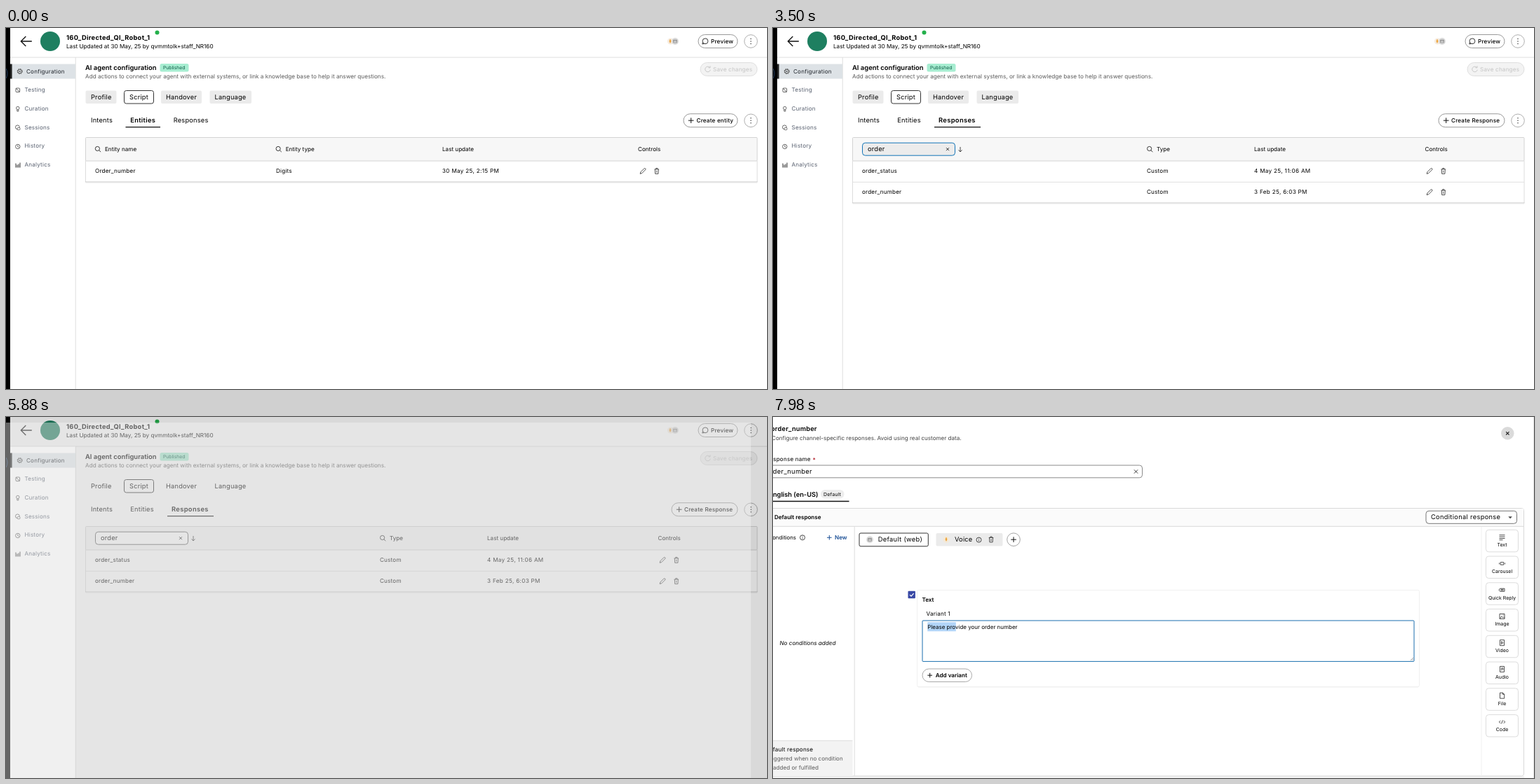
An HTML page for the animation above (8 s loop, 1085 px wide and 516 px high).

```html
<!DOCTYPE html>
<html lang="en">
<head>
<meta charset="utf-8">
<title>Agent responses</title>
<style>
html, body { margin: 0; width: 100%; height: 100%; overflow: hidden; background: #f4f4f4 }
svg { display: block; width: 100%; height: 100%; font-family: Inter, sans-serif; letter-spacing: .2px; text-rendering: geometricPrecision }
.b { font-weight: 600 }
.m { font-weight: 500 }
.n { letter-spacing: 0 }
.w { letter-spacing: .33px }
.g { fill: #5c5c5c }
.s { fill: #596170 }
.c { text-anchor: middle }
.veiled .soft { visibility: hidden }
</style>
</head>
<body>
<svg id="stage" viewBox="0 0 1085 516"></svg>
<script>
const SMALL = 6.96, BODY = 8.12, MID = 9.28;

const text = (x, y, str, size = BODY, cls = '', extra = '') =>
  `<text x="${x}" y="${y}" font-size="${size}" class="${cls}" ${extra}>${str}</text>`;
const rect = (x, y, w, h, fill, stroke = 'none', rx = 0, extra = '') =>
  `<rect x="${x}" y="${y}" width="${w}" height="${h}" fill="${fill}" stroke="${stroke}" rx="${rx}" ${extra}/>`;
const circle = (x, y, r, fill, stroke = 'none') =>
  `<circle cx="${x}" cy="${y}" r="${r}" fill="${fill}" stroke="${stroke}" stroke-width=".9"/>`;
const line = (d, stroke = '#222', width = .9, fill = 'none') =>
  `<path d="${d}" stroke="${stroke}" stroke-width="${width}" fill="${fill}"/>`;
const group = (id, ...parts) => `<g id="${id}">${parts.join('')}</g>`;

// Icons, placed by their centre
const plus = (x, y, color = '#111', r = 3.8) => line(`M${x - r} ${y}h${2 * r}M${x} ${y - r}v${2 * r}`, color, 1);
const cross = (x, y, r = 2, w = .9) => line(`M${x - r} ${y - r}l${2 * r} ${2 * r}m0 ${-2 * r}l${-2 * r} ${2 * r}`, '#222', w);
const search = (x, y) => circle(x - .6, y - .5, 3.1, 'none', '#222') + line(`M${x + 1.7} ${y + 1.8}l2.4 2.4`);
const down = (x, y) => line(`M${x} ${y - 3.5}v7m-2.5 -2.6l2.5 2.6l2.5 -2.6`, '#333');
const info = (x, y) => circle(x, y, 3.5, 'none', '#333') + line(`M${x} ${y - .4}v2.2m0 -4v.9`, '#333', .8);
const trash = (x, y) => line(`M${x - 3.3} ${y - 2.5}h6.6M${x - 1.2} ${y - 2.7}v-1.3h2.4v1.3M${x - 2.5} ${y - 2.3}l.4 6.2h4.2l.4 -6.2M${x} ${y - .6}v2.8`, '#333', .85);
const pencil = (x, y) => line(`M${x - 3.8} ${y + 3.9}l.7 -2.6l4.9 -4.9q1 -.8 1.8 0q.8 .8 0 1.8l-4.9 4.9z`, '#333', .85);
const kebab = (x, y) => circle(x, y, 9.3, '#fff', '#a5a5a5') + [-3.5, 0, 3.5].map(d => circle(x, y + d, .75, '#333')).join('');
const flame = (x, y) => line(`M${x} ${y - 3}q1.8 2.4 1 4.2q-1 1.2 -2 0q-.8 -1.8 1 -4.2M${x} ${y + 2}v1.2`, '#e8a33d', .4, '#efa53c');
const webIcon = (x, y) => circle(x, y, 5, '#dcdcdc') + line(`M${x - 2.4} ${y - 2}h4.8v4h-4.8zM${x - 2.4} ${y - .6}h4.8`, '#777', .7);
const pill = (x, y, w, h = 19, fill = '#fff', stroke = '#8e8e8e') => rect(x, y, w, h, fill, stroke, h / 2, 'stroke-width=".9"');

const chip = (x, w, tx, str) => rect(x, 89.5, w, 18.5, '#ebebeb', 'none', 2, 'class="soft"') + text(tx, 102, str, MID);

const sideIcons = [
  circle(19.7, 62, 2.8, 'none', '#444') + circle(19.7, 62, 1, '#444') +
    '<circle cx="19.7" cy="62" r="3.6" fill="none" stroke="#444" stroke-dasharray="1.4 1.43"/>',
  rect(14, 86, 5.6, 5.6, 'none', '#555', 1, 'stroke-width=".9"') + line('M14 86l5.6 5.6', '#555'),
  circle(16.8, 114.5, 2.2, 'none', '#555') + line('M15.8 117v2h2v-2', '#555'),
  circle(16.4, 141.8, 2.9, 'none', '#555') + rect(16.2, 142.5, 3.8, 3.2, '#fff', '#555', 1, 'stroke-width=".8"'),
  circle(16.8, 169.5, 3.2, 'none', '#555') + line('M16.8 167.5v2.2l1.6 .8', '#555'),
  line('M14 193.5v6M16 195.5v4M18 194.5v5M20 192.5v7', '#555', 1.2)
].join('');

const shell = [
  rect(0, 0, 1085, 516, '#fff'),
  rect(0, 0, 6, 516, '#000'),
  line('M0 58q4 7 0 14', '#26456b'),
  line('M36.8 19H21.5M28.3 12l-7 7l7 7', '#111', 1.3),
  circle(63, 19, 14, '#1e7f60'),
  text(86, 16.5, '160_Directed_QI_Robot_1', MID, 'w', 'font-weight="700"'),
  text(86, 29, 'Last Updated at 30 May, 25 by qvmmtolk+staff_NR160', 8.18, 'n'),
  circle(215.5, 6.4, 3, '#24b04b'),
  circle(947.5, 19, 4.6, '#f6ece0'), flame(947, 19), webIcon(954, 19),
  pill(987, 9.5, 56), circle(997, 18.8, 3.9, 'none', '#222'), line('M993.4 20.5l-.6 2.5l2.6 -.6'),
  text(1005, 22, 'Preview', BODY, 'm'), kebab(1062, 19),
  line('M6 42h1079M99.2 42v474', '#dedede', 1),
  rect(6, 51.5, 93, 21, '#dde2e6'), rect(6, 51.5, 2.6, 21, '#222'),
  sideIcons,
  text(29, 64.8, 'Configuration', BODY, '', 'fill="#20252c"'),
  ...['Testing', 'Curation', 'Sessions', 'History', 'Analytics'].map((s, i) => text(26.5, 91.3 + 26.7 * i, s, BODY, 's')),
  text(113, 59.5, 'AI agent configuration', 9.45, 'b n'),
  rect(219.5, 51, 41, 11.6, '#a7edd1', 'none', 2.5), text(224, 59.4, 'Published', 6.75, 'n', 'fill="#0c5a45"'),
  text(113, 71.6, 'Add actions to connect your agent with external systems, or link a knowledge base to help it answer questions.', 8.18, 'n g'),
  pill(990, 49.5, 81, 19, '#f3f3f3', '#dcdcdc'),
  line('M1003.5 56.5a3.8 3.8 0 1 0 .8 3.2M1004 54.2v2.6h-2.6', '#c4c4c4'),
  text(1008, 62, 'Save changes', BODY, '', 'fill="#c4c4c4"'),
  chip(113.5, 44, 121, 'Profile'),
  rect(168.5, 89.5, 42, 18.5, '#fff', '#333', 3), text(176, 102, 'Script', MID),
  chip(221, 58, 228, 'Handover'), chip(290.5, 59.5, 297.5, 'Language')
].join('');

const tableHead = rect(113.5, 156.5, 957.5, 33.5, '#f7f7f7', '#d3d3d3', 1);
const tableFrame = (bottom) =>
  line(`M113.5 190V${bottom}M1071 190V${bottom}`, '#dcdcdc', 1) +
  line(`M113 ${bottom}H1071.5`, '#c6c6c6', 1.2) + line(`M114 ${bottom + 1.2}H1071`, '#ececec', 1);
const controls = (x, y) => pencil(x, y) + trash(x + 19.8, y);
const under = (x, w) => line(`M${x} 141.6h${w}`, '#111', 1.4);

const entities = group('entities',
  rect(107, 118, 978, 140, '#fff'),
  group('tabHover', rect(231, 122, 65, 20, '#ececec', 'none', 2)),
  text(121, 135, 'Intents', MID), text(177.3, 135, 'Entities', MID, 'b w'), text(238.7, 135, 'Responses', MID),
  under(170.5, 49.5),
  pill(966, 122.7, 77), plus(976.7, 132.2), text(984.5, 135.2, 'Create entity', BODY, 'm'), kebab(1062, 132.3),
  tableHead, tableFrame(220),
  search(131, 173), text(141, 175.6, 'Entity name', BODY, 'n'), group('sort', down(192.5, 173.5)),
  search(388.7, 173), text(398.7, 175.6, 'Entity type', BODY, 'n'),
  text(622, 175.6, 'Last update', BODY, 'n'), text(901, 175.6, 'Controls', BODY, 'n'),
  text(127, 206.8, 'Order_number'), text(385, 206.8, 'Digits'), text(622, 206.8, '30 May 25, 2:15 PM', BODY, 'w'),
  controls(908, 204.5));

const responseRow = (y, name, date) =>
  text(127, y + 2.8, name) + text(533, y + 2.8, 'Custom') + text(686, y + 2.8, date, BODY, 'w') + controls(936, y + .5);

const responses = group('responses',
  rect(107, 118, 978, 140, '#fff'),
  group('tabHover2', rect(231, 122, 65, 20, '#ececec', 'none', 2)),
  text(121, 135, 'Intents', MID), text(177.3, 135, 'Entities', MID), text(236, 135, 'Responses', 9.4, 'b w'),
  under(230, 66),
  pill(949, 122.7, 94), plus(959.7, 132.2), text(967, 135.2, 'Create Response', BODY, 'm'), kebab(1062, 132.3),
  tableHead, tableFrame(250), line('M114 220.3h957', '#e0e0e0', 1),
  rect(127.5, 164.2, 132, 18, '#fff', '#666', 4, 'id="field"'),
  rect(135, 167, 24.5, 13, '#a9cdee', 'none', 0, 'id="picked"'),
  text(135, 176.3, 'order', MID), cross(249, 173.2), down(267, 173.5),
  search(537.2, 173), text(547, 175.6, 'Type', BODY, 'n'),
  text(686, 175.6, 'Last update', BODY, 'n'), text(929.5, 175.6, 'Controls', BODY, 'n'),
  responseRow(204, 'order_status', '4 May 25, 11:06 AM'),
  responseRow(234.2, 'order_number', '3 Feb 25, 6:03 PM'));

// Veil over the page when the dialog starts to open; the sidebar stays lighter
const veil = group('veil',
  rect(0, 0, 1085, 516, '#000', 'none', 0, 'opacity=".08"'),
  '<path d="M0 0H1085V516H99V42H0z" opacity=".08"/>',
  rect(0, 8, 1062, 508, '#f6f6f6', 'none', 0, 'opacity=".41"'));

const ghost = rect(6, 52, 93, 410, '#fff') + rect(113, 190, 957, 60, '#fff');

const toolIcons = {
  Text: 'M-4 -3h8M-4 -.6h8M-4 1.8h8M-4 4h5',
  Carousel: 'M-2.2 -1.8h4.4v3.6h-4.4zM-4 -1v2M4 -1v2',
  'Quick Reply': 'M-3 -2h6.5v4h-6.5l-1.5 -2zM-2 -.6h4M-2 .8h4',
  Image: 'M-3.5 -3.5h7v7h-7zM-3 3l2.3 -3l1.7 1.8l1 -1l1.5 1.7M1 -1.8h1',
  Video: 'M-3 -4h6v8h-6zM-1 -1.8l2.6 1.8l-2.6 1.8z',
  Audio: 'M-3 -4h6v8h-6zM-.8 1.6v-3.2h2v2.6M-1.4 1.6h.6M.6 1h.6',
  File: 'M-3 -4h4l2.2 2.2v5.8h-6.2zM1 -4v2.2h2.2',
  Code: 'M-2.2 -2l-2 2l2 2M2.2 -2l2 2l-2 2M.8 -2.5l-1.6 5'
};
const tools = Object.entries(toolIcons).map(([name, d], i) => {
  const y = 161.3 + 37.75 * i;
  return rect(1016.5, y, 46, 31.5, '#fff', '#dcdcdc', 4) +
    `<g transform="translate(1039.5 ${y + 10.4})">${line(d, '#222', .8)}</g>` +
    text(1039.5, y + 23.8, name, SMALL, 'c n');
}).join('');

const dialogBody = group('dialogBody',
  rect(0, 0, 1085, 516, '#fff'),
  text(-10, 63, 'Response name'), text(56.5, 63.5, '*', BODY, 'b', 'fill="#b3202c"'),
  rect(-20, 69, 546.5, 17.8, '#fff', '#8a8a8a', 4), text(-9.7, 81, 'order_number', MID, 'w'), cross(517.5, 78, 2.6),
  text(-5.7, 113.5, 'English (en-US)', MID, 'b n'),
  rect(68, 104, 33.5, 12.5, '#ededed', 'none', 6.2), text(72, 112.8, 'Default', SMALL),
  line('M0 120.5h108.5', '#111', 1.3),
  rect(-20, 130.5, 1090.5, 382.5, '#fff', '#d9d9d9', 3), rect(0, 131, 1070, 25, '#fbfbfb'),
  line('M0 156.3h1070', '#d9d9d9', 1), line('M116.2 156v357', '#dcdcdc', 1), line('M1010 157v356', '#f0f0f0', 1),
  line('M0 514.5h1071', '#e8e8e8', 1), line('M1084.5 0v516', '#e2e2e2', 1),
  text(2, 146, 'Default response', 8.05, 'b n'),
  rect(931, 134.3, 129.5, 18, '#fff', '#777', 4), text(938, 146.4, 'Conditional response', MID, 'w'),
  line('M1048.3 142.2h5.6l-2.8 3z', 'none', 0, '#444'),
  text(-6.5, 174.8, 'Conditions', 7.8, 'n'), info(42, 172.3), plus(80.3, 172.3, '#1b4f96', 3.3),
  text(88, 174.9, 'New', BODY, 'b n', 'fill="#1b4f96"'),
  rect(123, 166, 98.3, 18.8, '#fff', '#333', 2), webIcon(138, 175.3), text(149.7, 178.3, 'Default (web)', MID, 'w'),
  rect(232.5, 166, 95, 18.6, '#ebebeb', 'none', 2), circle(247, 175.2, 4.8, '#f4ead9'), flame(247, 175),
  text(259, 178.3, 'Voice', MID), info(293.5, 175.6), trash(311, 175),
  circle(343, 175.2, 9.3, '#fff', '#999'), plus(343, 175.2),
  text(9.5, 325.5, 'No conditions added', BODY, 'n', 'font-style="italic"'),
  rect(0, 463, 113.5, 50, '#f3f3f3'), line('M0 462.7h113.5', '#dedede', 1),
  text(-11.3, 477.8, 'Default response'),
  text(-9, 491, 'Triggered when no condition', 8, 'n g'), text(-8.5, 504, 'is added or fulfilled', BODY, 'n g'),
  group('pending', ...['Response menu', 'output is', 'unavailable'].map((s, i) => text(1040, 336 + 9.3 * i, s, SMALL, 'c g'))));

const card = group('card',
  tools,
  rect(206, 248.5, 715, 138, '#eee', 'none', 2), rect(205.5, 247.5, 716, 138, '#fff', '#f0f0f0', 2),
  group('check', rect(192.5, 248.8, 10.4, 10.4, '#3848a5', 'none', 1), line('M195 254.2l2 2l3.6 -4', '#fff', 1.2)),
  text(212.5, 264.2, 'Text', BODY, 'b n'), text(218.5, 284.2, 'Variant 1'),
  rect(213, 291, 701, 58.4, '#fff', '#999', 1, 'id="area"'),
  line('M909 348l4 -4M911.3 348l1.7 -1.7', '#777', .7),
  rect(220.3, 293.3, 0, 13, '#b2d5f8', 'none', 0, 'id="marked"'),
  text(220.3, 302.8, 'Please provide your order number', 7.98, 'n'),
  pill(213, 360, 70.5, 18.5, '#fff', '#a0a0a0'), plus(223.7, 369.2, '#111', 3.3), text(231.7, 372, 'Add variant', BODY, 'b n'));

const dialogHead = group('dialogHead',
  text(-3, 20, 'order_number', MID, 'b'),
  text(-2, 32.6, 'Configure channel-specific responses. Avoid using real customer data.', 8.08, 'n', 'fill="#444"'),
  circle(1047.3, 23.3, 9.2, '#dadada'), cross(1047.3, 23.3, 2.2, 1.1));

const stage = document.getElementById('stage');
stage.innerHTML = ghost + group('page', shell, entities, responses) + veil + dialogBody + card + dialogHead;

const el = id => document.getElementById(id);
const fade = (id, v) => {
  el(id).setAttribute('opacity', v);
  el(id).setAttribute('visibility', v > 0 ? 'inherit' : 'hidden');
};
const ramp = (t, from, to) => Math.min(1, Math.max(0, (t - from) / (to - from)));

function draw(time) {
  const t = Math.floor(time / 70) * 70;

  fade('sort', +(t === 980));
  fade('tabHover', +(t >= 1190));
  fade('tabHover2', +(t < 1960));
  fade('responses', ramp(t, 1470, 1820));

  const focused = t >= 3500 && t < 5670;
  el('field').setAttribute('fill', focused ? '#ececec' : '#fff');
  el('field').setAttribute('stroke', focused ? '#1375b8' : '#666');
  fade('picked', +(t >= 3640 && t < 5670));

  stage.classList.toggle('veiled', t >= 5880);
  fade('page', t < 5950 ? 1 : .14 * (1 - ramp(t, 5950, 6090)));
  fade('veil', +(t === 5880));
  fade('dialogHead', +(t >= 5950));
  fade('dialogBody', t < 5950 ? 0 : .15 + .85 * ramp(t, 5950, 6160));
  fade('pending', +(t < 6160));
  fade('card', ramp(t, 6020, 6370));
  fade('check', ramp(t, 6580, 6720));

  el('area').setAttribute('stroke', t >= 7070 ? '#1a6fae' : '#999');
  el('marked').setAttribute('width', 40.5 * ramp(t, 7770, 7980));
}

function tick() {
  draw(performance.now() % 8000);
  requestAnimationFrame(tick);
}
tick();
</script>
</body>
</html>
```
